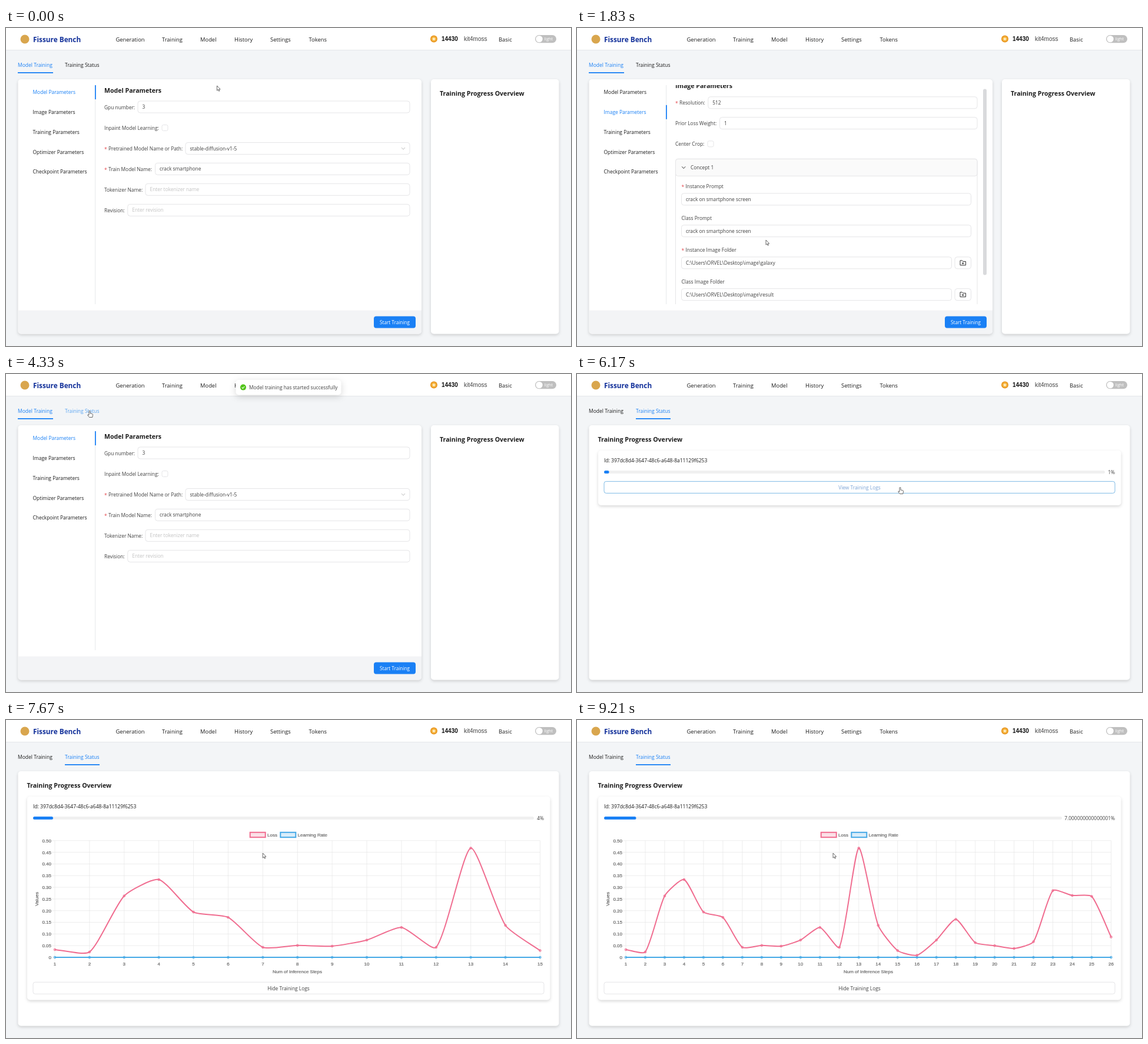
Recreate the animation shown at these times as an HTML page. Size 960 px wide and 540 px high, loop 9250 ms.

```html
<!DOCTYPE html>
<html lang="en">
<head>
<meta charset="utf-8">
<title>Model training</title>
<style>
  html, body { margin: 0; width: 100%; height: 100%; overflow: hidden; background: #f3f5f7; }
  svg { display: block; font-family: "Open Sans", "Noto Sans", sans-serif; }
  .arial { font-family: "Liberation Sans", Arial, sans-serif; }
  .card { filter: drop-shadow(0 2px 2.5px rgba(0, 0, 0, .16)); }
  .toast { filter: drop-shadow(0 3px 6px rgba(0, 0, 0, .16)); }
</style>
</head>
<body>
<svg id="stage" width="960" height="540" viewBox="0 0 960 540"></svg>
<script>
const LOOP = 9250;
const BLUE = '#1a80f5', INK = '#1c1c1c', GREY = '#404040', LINE = '#e2e3e5';
const PINK = '#f06d90', SKY = '#46a9e6';

// Moments at which the interface changes
const OPEN_IMAGES = 800, SCROLL = 1780, START = 3850, TOAST = 3920, TOAST_END = 5500,
      OPEN_STATUS = 5200, OPEN_LOGS = 6300;

const LOSS = [.033, .023, .263, .333, .194, .171, .043, .051, .048, .074, .128, .043, .468,
              .137, .029, .009, .074, .163, .063, .05, .038, .067, .286, .265, .261, .087];

// time, x, y of the pointer tip
const POINTER = [
  [30, 358.5, 98], [700, 84, 139], [1050, 84, 139], [1650, 321, 360], [2800, 321, 360],
  [3650, 655, 497], [3950, 655, 497], [4300, 142, 62.5], [5300, 142, 62.5],
  [6050, 549, 192.5], [6350, 549, 192.5], [6900, 437, 226], [7300, 437, 226], [8200, 435, 226]
];
const HAND_TIMES = [[650, 1080], [3600, 3970], [4280, 5320], [6000, OPEN_LOGS]];

const between = (t, a, b) => t >= a && t < b;
const ease = p => { p = Math.min(1, Math.max(0, p)); return p * p * (3 - 2 * p); };

// y is the vertical middle of the text
const text = (x, y, str, size = 8.4, fill = GREY, extra = '') =>
  `<text x="${x}" y="${y + size * .36}" font-size="${size}" fill="${fill}" ${extra}>${str}</text>`;
const rect = (x, y, x2, y2, fill, r = 0, extra = '') =>
  `<rect x="${x}" y="${y}" width="${x2 - x}" height="${y2 - y}" rx="${r}" fill="${fill}" ${extra}/>`;
const path = (d, stroke, width = 1, fill = 'none') =>
  `<path d="${d}" fill="${fill}" stroke="${stroke}" stroke-width="${width}"/>`;
const circle = (x, y, r, fill, extra = '') => `<circle cx="${x}" cy="${y}" r="${r}" fill="${fill}" ${extra}/>`;
const at = (x, y, inner) => `<g transform="translate(${x} ${y})">${inner}</g>`;
const outlined = (stroke = LINE) => `stroke="${stroke}" stroke-width=".9"`;
const BOLD = 'font-weight="700"', MEDIUM = 'font-weight="500"', MIDDLE = 'text-anchor="middle"', END = 'text-anchor="end"';

const title = (x, y, str) => text(x, y, str, 10.6, INK, BOLD);
const label = (x, y, str, required) =>
  (required ? text(x, y + 1, '*', 8.4, '#e5484d') : '') + text(x + (required ? 7 : 0), y, str);
const input = (x, x2, y, value, fill = GREY) =>
  rect(x, y - 10, x2, y + 10, '#fff', 4, outlined()) + text(x + 7.5, y, value, 8.4, fill);
const checkbox = (x, y) => rect(x, y - 5, x + 10, y + 5, '#fff', 2.5, outlined());
const panel = (x, y, x2, y2) => rect(x, y, x2, y2, '#fff', 5, 'class="card"');
const button = (y, str, stroke = LINE, fill = GREY) =>
  rect(46, y - 10, 914, y + 10, '#fff', 3.5, outlined(stroke)) + text(480, y + .3, str, 8.4, fill, MIDDLE);

function header() {
  const nav = [[186.5, 'Generation'], [265, 'Training'], [330, 'Model'], [388, 'History'],
               [449, 'Settings'], [514.5, 'Tokens'], [837, 'Basic']];
  return rect(0, 0, 960, 37.5, '#fff') + rect(0, 37, 960, 38, '#e4e6e9') +
    circle(32, 19, 7.5, '#d9a64e') +
    text(46, 19.5, 'Fissure Bench', 11.8, '#12309a', BOLD) +
    nav.map(([x, s]) => text(x, 19.2, s, 9.4, INK)).join('') +
    circle(727, 18.5, 6, '#e8951f') + circle(727, 18.5, 4.4, '#f5b23c') +
    path('M727 15.5l.9 2 2.2.2-1.7 1.5.5 2.1-1.9-1.1-1.9 1.1.5-2.1-1.7-1.5 2.2-.2z', 'none', 0, '#fff3cf') +
    text(740, 18.6, '14430', 10, '#111', `class="arial" ${BOLD}`) +
    text(778, 18.6, 'kit4moss', 10, '#444', 'class="arial"') +
    rect(899, 12, 935, 25.3, '#bfbfbf', 6.6) + circle(906, 18.6, 5.7, '#fff') +
    text(914.5, 18.6, 'light', 7.2, '#fff');
}

function tabs(status, hover) {
  const [x, x2] = status ? [100, 159] : [20, 80];
  return text(20, 62.5, 'Model Training', 8.5, status ? INK : BLUE, MEDIUM) +
    text(100, 62.5, 'Training Status', 8.5, status ? BLUE : hover ? '#5aa5f2' : INK, MEDIUM) +
    rect(x, 75, x2, 76.8, BLUE);
}

function sidebar(active) {
  const names = ['Model', 'Image', 'Training', 'Optimizer', 'Checkpoint'];
  const y = 109.3 + 33.75 * active;
  return rect(151.3, 97, 152.1, 469, LINE) + rect(151, y - 12.2, 152.8, y + 11.8, BLUE) +
    names.map((s, i) =>
      text(45.5, 109.3 + 33.75 * i, s + ' Parameters', 8.45, i === active ? BLUE : INK, MEDIUM)).join('');
}

function modelForm() {
  const HINT = '#c2c2c2';
  return title(167, 106, 'Model Parameters') +
    label(167, 134.5, 'Gpu number:') + input(224, 686, 134, '3') +
    label(167, 169.8, 'Inpaint Model Learning:') + checkbox(265, 169.5) +
    label(167, 204.8, 'Pretrained Model Name or Path:', true) + input(305, 686, 204.5, 'stable-diffusion-v1-5') +
    path('M672 203l3 3.2 3-3.2', '#b5b5b5', .9) +
    label(167, 239.8, 'Train Model Name:', true) + input(253.5, 686, 239.3, 'crack smartphone') +
    label(167, 274.8, 'Tokenizer Name:') + input(237, 686, 274.3, 'Enter tokenizer name', HINT) +
    label(167, 309.8, 'Revision:') + input(206.8, 686, 309.3, 'Enter revision', HINT);
}

function folderRow(y, value) {
  return input(177.5, 636.5, y, value) + rect(642, y - 10, 669.5, y + 10, '#fff', 4, outlined()) +
    path(`M651 ${y + 4}v-8h3.4l1.4 1.6h4.7v6.4zM655.7 ${y - 1}v3.6M653.9 ${y + .8}h3.6`, '#333', 1);
}

function imageForm(scroll) {
  const dir = 'C:\\Users\\ORVEL\\Desktop\\image\\';
  return '<clipPath id="view"><path d="M153 97H706V469H153z"/></clipPath><g clip-path="url(#view)">' +
    at(0, 7.5 - scroll,
      title(167, 98.7, 'Image Parameters') +
      label(167, 127.5, 'Resolution:', true) + input(222.8, 680, 127, '512') +
      label(167, 162.3, 'Prior Loss Weight:') + input(242.5, 680, 161.8, '1') +
      label(167, 197.5, 'Center Crop:') + checkbox(222, 197) +
      rect(167.5, 222.5, 680, 474, '#fff', 4, outlined()) +
      rect(167.5, 222.5, 680, 251.5, '#fafafa', 4, outlined()) +
      path('M178.2 235.5l3 3.2 3-3.2', '#333', 1) + text(193, 237.3, 'Concept 1') +
      label(177.5, 269.5, 'Instance Prompt', true) + input(177.5, 669.5, 291, 'crack on smartphone screen') +
      label(177.5, 323.5, 'Class Prompt') + input(177.5, 669.5, 344.8, 'crack on smartphone screen') +
      label(177.5, 377.5, 'Instance Image Folder', true) + folderRow(399, dir + 'galaxy') +
      label(177.5, 431.5, 'Class Image Folder') + folderRow(452.8, dir + 'result')) +
    rect(690, 97 + .85 * scroll, 696, 413 + .85 * scroll, '#d9dadc', 3) + '</g>';
}

function trainingPage(t) {
  const images = between(t, OPEN_IMAGES, START);
  const hover = between(t, 3600, 3980);
  return panel(20.5, 87, 706, 519.5) +
    path('M20.5 479.5H706V514.5a5 5 0 0 1-5 5H25.5a5 5 0 0 1-5-5z', 'none', 0, '#f3f4f6') +
    panel(722, 87, 939.5, 519.5) + title(737, 111, 'Training Progress Overview') +
    sidebar(images ? 1 : 0) + (images ? imageForm(66 * ease((t - SCROLL) / 240)) : modelForm()) +
    rect(625, 489.5, 696, 509.5, hover ? '#4096ff' : BLUE, 4) + text(660.5, 500, 'Start Training', 8.2, '#fff', MIDDLE);
}

// Smooth curve whose handles follow the distance between neighbouring points
function curve(points, tension = .2) {
  const handles = points.map((p, i) => {
    const a = points[i - 1] || p, b = points[i + 1] || p;
    const da = Math.hypot(p[0] - a[0], p[1] - a[1]), db = Math.hypot(b[0] - p[0], b[1] - p[1]);
    const shift = k => [p[0] + k * (b[0] - a[0]), Math.min(403, p[1] + k * (b[1] - a[1]))];
    return [shift(-tension * da / (da + db)), shift(tension * db / (da + db))];
  });
  return 'M' + points[0] + points.slice(1).map((p, i) => `C${handles[i][1]} ${handles[i + 1][0]} ${p}`).join('');
}

function chart(count) {
  const max = count < 13 ? 7 : 10, left = 83, right = 907.5, top = 204.8, bottom = 403;
  const px = i => left + (right - left) * i / (count - 1);
  const py = v => bottom - (bottom - top) * v / (max * .05);
  const tick = (x, y, s, anchor) => text(x, y, s, 8, '#666', `${anchor} stroke="#666" stroke-width=".2"`);
  const points = LOSS.slice(0, count).map((v, i) => [px(i), py(v)]);
  const series = (pts, color) => path(curve(pts), color, 2) +
    pts.map(p => circle(p[0], p[1], 1.9, color, `fill-opacity=".5" stroke="${color}" stroke-width=".7"`)).join('');
  const key = (x, color, fill, s) =>
    rect(x, 190.8, x + 26, 199.2, fill, 0, `stroke="${color}" stroke-width="2"`) + tick(x + 29.3, 194.8, s, '');
  let grid = '', marks = '';
  for (let i = 0; i < count; i++) {
    grid += `M${px(i)} ${top}V${bottom + 5}`;
    marks += tick(px(i), 414, i + 1, MIDDLE);
  }
  for (let i = 0; i <= max; i++) {
    const y = py(i * .05);
    grid += `M${left - 5} ${y}H${right}`;
    marks += tick(77, y, i ? (i * .05).toFixed(2) : '0', END);
  }
  return '<g class="arial">' + path(grid, '#e6e6e6', .7) + marks +
    key(414.7, PINK, '#fbe0e7', 'Loss') + key(466.3, SKY, '#d9edfa', 'Learning Rate') +
    tick(495, 427.3, 'Num of Inference Steps', MIDDLE) +
    at(52.5, 304, `<g transform="rotate(-90)">${tick(0, 0, 'Values', MIDDLE)}</g>`) +
    series(points.map(p => [p[0], bottom]), SKY) + series(points, PINK) + '</g>';
}

function statusPage(t) {
  const count = Math.min(26, Math.max(0, 11 + Math.floor((t - 7030) / 140)));
  const percent = Math.round(count * .28);
  const shown = percent === 7 ? percent / 100 * 100 : percent;
  const trackEnd = percent === 7 ? 824 : 897;
  const logs = t >= OPEN_LOGS, hover = t > 6010;
  return panel(20.5, 87, 939.5, 519.5) + title(35.5, 111, 'Training Progress Overview') +
    panel(36, 130, 924.5, logs ? 475.5 : 223) +
    text(46, 147.3, 'Id: 397dc8d4-3647-48c6-a648-8a11129f6253', 8.5, INK, MEDIUM) +
    rect(46, 164, trackEnd, 169, '#f0f0f0', 2.5) +
    rect(46, 164, 46 + (trackEnd - 46) * percent / 100, 169, BLUE, 2.5) +
    text(914, 167, shown + '%', 8.4, GREY, END) +
    (logs ? chart(count) + button(455.2, 'Hide Training Logs')
          : hover ? button(192.4, 'View Training Logs', '#72b4e2', '#7ba3d6')
                  : button(192.4, 'View Training Logs'));
}

function toast(t) {
  const shown = ease((t - TOAST) / 200) * (1 - ease((t - TOAST_END) / 200));
  if (!shown) return '';
  return `<g opacity="${shown}">` + at(0, 26 * (shown - 1),
    rect(390.5, 10, 569.5, 35.5, '#fff', 5, 'class="toast"') + circle(403, 22.6, 5, '#52c41a') +
    path('M400.7 22.7l1.7 1.8 2.9-3.5', '#fff', 1.1) +
    text(413, 22.8, 'Model training has started successfully', 8.35)) + '</g>';
}

function pointer(t) {
  let i = POINTER.findIndex(k => k[0] > t);
  if (i < 0) i = POINTER.length;
  const a = POINTER[Math.max(0, i - 1)], b = POINTER[Math.min(i, POINTER.length - 1)];
  const p = b[0] > a[0] ? ease((t - a[0]) / (b[0] - a[0])) : 0;
  const hand = HAND_TIMES.some(([from, to]) => between(t, from, to));
  const shape = hand
    ? 'M-1 1a1 1 0 0 1 2 0v3.4l3.5.8q1.2.3 1 1.6l-.7 4.2h-5.3l-2.8-3.6q.2-1.2 1.3-.7l1 .7z'
    : 'M0 0v8.2l1.9-1.7 1.3 2.8 1.2-.5-1.3-2.7h2.6z';
  return at(a[1] + (b[1] - a[1]) * p, a[2] + (b[2] - a[2]) * p, path(shape, '#444', .8, '#fff'));
}

const stage = document.getElementById('stage');
const begin = performance.now();

function draw() {
  const t = (performance.now() - begin) % LOOP;
  const status = t >= OPEN_STATUS;
  stage.innerHTML = rect(0, 0, 960, 540, '#f3f5f7') + header() +
    tabs(status, between(t, 4260, OPEN_STATUS)) +
    (status ? statusPage(t) : trainingPage(t)) + toast(t) + pointer(t);
  requestAnimationFrame(draw);
}
draw();
</script>
</body>
</html>
```
